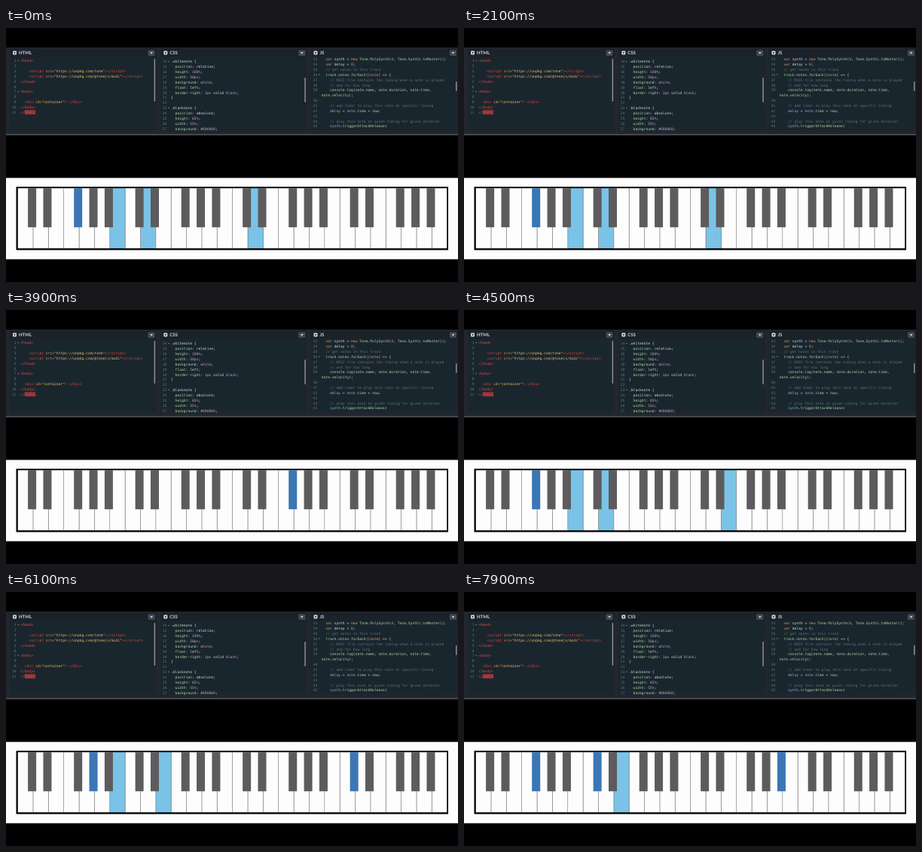
Animation of 600x338 px, one loop 8000 ms. Source, as an HTML page:

```html
<!DOCTYPE html>
<html lang="en">
<head>
<meta charset="utf-8">
<title>Piano player</title>
<style>
  html, body { margin: 0; width: 100%; height: 100%; overflow: hidden; background: #000; }
  svg { display: block; width: 100vw; height: 100vh; }
  text { font: 4.66px "DejaVu Sans Mono", monospace; white-space: pre; text-rendering: geometricPrecision; }
  .title { font: bold 6px Lato, sans-serif; fill: #d3d6dc; }
  .num { fill: #66757d; text-anchor: end; }
  .w { fill: #d3dbdd; }
  .r { fill: #e2473f; }
  .o { fill: #e89a50; }
  .y { fill: #ecc063; }
  .g { fill: #b2d6a4; }
  .p { fill: #c99fc6; }
  .b { fill: #7fb4dc; }
  .c { fill: #647178; }
  .white { fill: #fefdfe; }
  .black { fill: #5d5b5d; }
  .white.on { fill: #7ac3e7; }
  .black.on { fill: #3a77b4; }
</style>
</head>
<body>
<svg viewBox="0 0 600 338" preserveAspectRatio="none">
  <rect width="600" height="338"/>
  <rect y="26" width="600" height="116" fill="#24262f"/>
  <g id="panes"></g>
  <rect y="141.5" width="600" height="1" fill="#74797c"/>
  <rect y="199.5" width="600" height="108.2" fill="#fefdfe"/>
  <rect x="13.5" y="211.3" width="573.5" height="84.2"/>
  <g id="keys"></g>
</svg>
<script>
function add(parent, tag, attrs, text) {
  const el = document.createElementNS("http://www.w3.org/2000/svg", tag);
  for (const k in attrs) el.setAttribute(k, attrs[k]);
  if (text !== undefined) el.textContent = text;
  return parent.appendChild(el);
}

// In the listings "§x" switches to colour class x.
const panes = [
  { x: 5, end: 199.6, title: "HTML", col: 19.2, y: 45.2, first: 1, bar: [41, 57], code: String.raw`§r<head>

    §r<script §osrc=§y"https://unpkg.com/tone"§r><\/script>
    §r<script §osrc=§y"https://unpkg.com/@tonejs/midi"§r><\/script>
§r</head>

§r<body>

  §r<div §oid=§y"container"§r> </div>
§r</body>
§r</html>` },
  { x: 205.3, end: 399.3, title: "CSS", col: 219, y: 46.4, first: 14, bar: [66, 33], code: `§w.whitenote {
  §gposition: §wrelative;
  §gheight: §p100%§w;
  §gwidth: §p50px§w;
  §gbackground: §pwhite§w;
  §gfloat: §wleft;
  §gborder-right: §p1px §wsolid §pblack§w;
§w}

§w.blacknote {
  §gposition: §wabsolute;
  §gheight: §p65%§w;
  §gwidth: §p55%§w;
  §gbackground: §p#696969§w;` },
  { x: 404.5, end: 600, title: "JS", col: 418.8, y: 43.2, first: 33, bar: [71, 13], code: `  §ovar §wsynth = §onew §gTone.PolySynth§w(§p4§w, §gTone.Synth§w).§gtoMaster§w();
  §ovar §wdelay = §p0§w;
  §c// get notes in this track
  §gtrack.notes.forEach§w((§onote§w) => {
    §c// MIDI file contains the timing when a note is played
    §c// and for how long
    §gconsole.log§w(§gnote.name§w, §gnote.duration§w, §gnote.time§w,
§gnote.velocity§w);

    §c// add timer to play this note at specific timing
    §bdelay §w= §bnote§w.§gtime §w+ §gnow§w;

    §c// play this note at given timing for given duration
    §bsynth§w.§gtriggerAttackRelease§w(` }
];

function drawPane(p) {
  const g = add(document.getElementById("panes"), "g", {});
  add(g, "rect", { x: p.x, y: 27, width: p.end - p.x, height: 110, fill: "#1a262e" });
  add(g, "rect", { x: p.x, y: 27, width: p.end - p.x, height: 12, fill: "#1b222a" });
  add(g, "rect", { x: p.x + 4, y: 30.5, width: 5, height: 5, rx: 1, fill: "#d6d8dc" });
  add(g, "circle", { cx: p.x + 6.5, cy: 33, r: 1, fill: "#1b222a" });
  add(g, "text", { x: p.x + 12, y: 35.2, class: "title" }, p.title);
  const bx = p.end - 11;
  add(g, "rect", { x: bx, y: 29.5, width: 9, height: 7.5, rx: 1, fill: "#444953" });
  add(g, "path", { d: `M${bx + 2.6} 32.2h3.8l-1.9 2.4z`, fill: "#e4e6ea" });
  add(g, "rect", { x: p.end - 3, y: p.bar[0], width: 1.5, height: p.bar[1], rx: .7, fill: "#87939a" });

  let num = p.first;
  p.code.replaceAll("<\\/", "</").split("\n").forEach((line, i) => {
    const y = p.y + i * 6.86;
    if (line.endsWith("</html>"))
      add(g, "rect", { x: p.col + 5.6, y: y - 4.7, width: 14.4, height: 6, fill: "#8c333a" });
    if (!line.startsWith("§gnote")) add(g, "text", { x: p.col - 5.6, y, class: "num" }, num++);
    if (/\{$|^§r<(head|body)/.test(line))
      add(g, "path", { d: `M${p.col - 4.2} ${y - 2.3}h2.2l-1.1 1.5z`, fill: "#7d8b92" });
    const t = add(g, "text", { x: p.col, y });
    line.split("§").forEach((s, n) =>
      add(t, "tspan", n ? { class: s[0] } : {}, n ? s.slice(1) : s));
  });
}
panes.forEach(drawPane);

// White keys are whole numbers; the black key after white n is n + 0.5.
const keyBox = document.getElementById("keys");
const LEFT = 15.8, STEP = 20.36, COUNT = 28, keys = {};
const addKey = (x, width, height, kind) =>
  add(keyBox, "rect", { x, y: 213.2, width, height, class: kind });
for (let i = 0; i < COUNT; i++) {
  const x = LEFT + i * STEP;
  keys[i] = addKey(x, Math.min(STEP, 585.2 - x), 80, "white");
  if (i) addKey(x - .6, .7, 80, "line").setAttribute("fill", "#8c8c8c");
}
for (let i = 0; i < COUNT - 1; i++)
  if (i % 7 !== 2 && i % 7 !== 6)
    keys[i + .5] = addKey(LEFT + i * STEP + 13.3, 11, 52, "black");

// Note name such as "F#0" to key number.
const key = s => "CDEFGAB".indexOf(s[0]) + 7 * s.at(-1) + (s[1] === "#" ? .5 : 0);
const toKeys = s => s.split(" ").filter(Boolean).map(key);

// Waltz accompaniment: bass on beat one, chord held over beats two and three.
// Times are in tenths of a second.
const BEAT = 4, FIRST_BAR = -9;
const bars = [
  ["", "F#0 B0 D1"], ["C#0", "F#0 A#0 E1"], ["", "F#0 B0 D1"], ["", "F#0 B0 D1"],
  ["", "F#0 B0 D1"], ["", "G#0 B0 E1"], ["", "G0 B0 E1"], ["", "F#0 C#1 E1"]
].map(bar => bar.map(toKeys));

// The melody steps along the B minor scale between [time, degree] points.
const scale = toKeys("B1 C#2 D2 E2 F#2 G2 A#2 B2 C#3 D3");
const line = [
  [0, 2], [2, 1], [4, 3], [10, 3], [13, 4], [17, 4], [27, 0], [34, 2], [39, 4],
  [42, 5], [45, 3], [47, 3], [49, 9], [53, null], [56, 8], [58, 9], [60, 7],
  [62, 9], [66, 9], [70, 8], [72, 9], [74, 8], [76, 8], [79, 6], [80, 6]
];

function melody(t) {
  const i = line.findIndex(p => p[0] > t);
  const [t0, d0] = line[i - 1], [t1, d1] = line[i];
  if (d0 === null) return [];
  const d = d1 === null ? d0 : d0 + (d1 - d0) * (t - t0) / (t1 - t0);
  return [scale[Math.round(d)]];
}

function harmony(t) {
  const beat = Math.floor((t - FIRST_BAR) / BEAT);
  const [bass, chord] = bars[Math.floor(beat / 3)];
  return beat % 3 ? chord : bass;
}

function draw(ms) {
  const t = Math.floor(ms % 8000 / 100);
  const down = [...harmony(t), ...melody(t)];
  for (const k in keys) keys[k].classList.toggle("on", down.includes(+k));
}

const start = performance.now();
function tick() {
  draw(performance.now() - start);
  requestAnimationFrame(tick);
}
tick();
</script>
</body>
</html>
```
